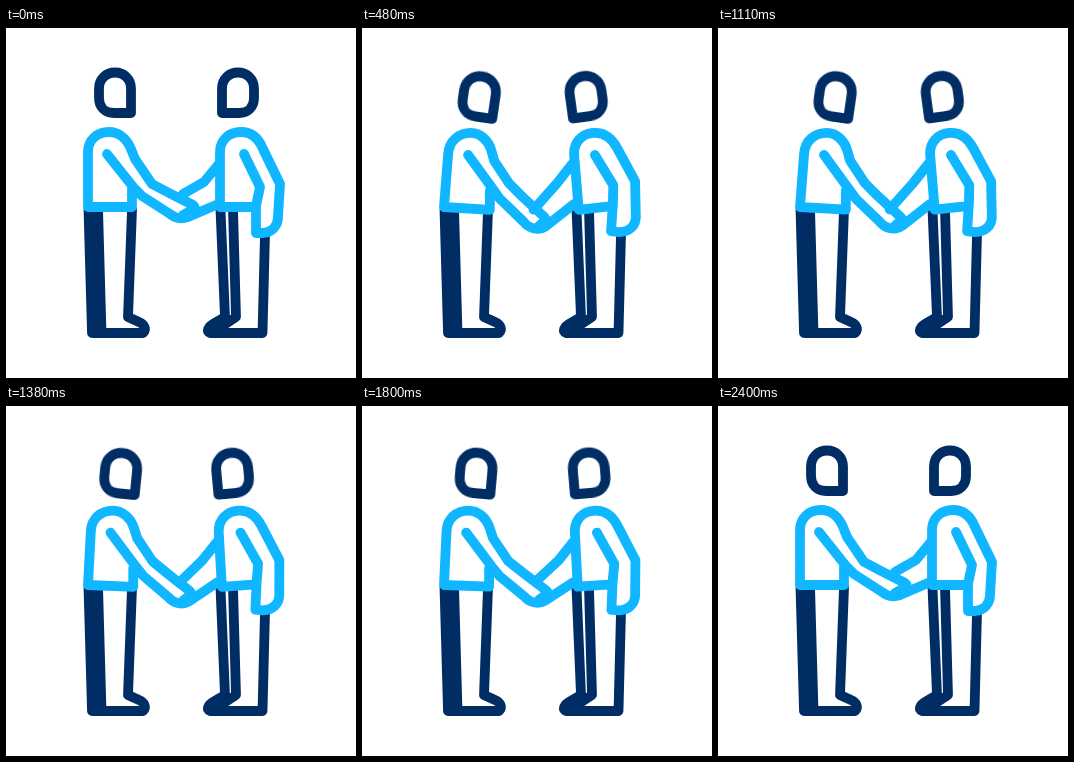
An HTML page without scripts for the animation above (8000 ms loop, 350x350 px).

```html
<!DOCTYPE html>
<html lang="en">
<head>
<meta charset="utf-8">
<title>Handshake</title>
<style>
html, body { margin: 0; width: 100%; height: 100%; overflow: hidden; background: #fff; }
svg { display: block; width: 100vw; height: 100vh; }
path { fill: none; stroke-width: 9.8; stroke-linecap: round; stroke-linejoin: round; }
.navy { stroke: #002d64; }
.blue { stroke: #10b6ff; }
.bend { d: var(--rest); animation: bend 8s infinite; }
.nod { animation: nod 8s infinite; }
.left { --tilt: 9deg; transform-origin: 87px 124px; }
.right { --tilt: -8.5deg; transform-origin: 253.5px 124px; }

/* three 800 ms shakes, then a pause */
@keyframes bend {
  0%, 10%, 20% { d: var(--rest); animation-timing-function: cubic-bezier(.32, 0, .58, 1); }
  5%, 15%, 25% { d: var(--low); animation-timing-function: cubic-bezier(.42, 0, .68, 1); }
  30%, 100% { d: var(--rest); }
}
@keyframes nod {
  0%, 10%, 20% { transform: rotate(0deg); animation-timing-function: cubic-bezier(.32, 0, .58, 1); }
  5%, 15%, 25% { transform: rotate(var(--tilt)); animation-timing-function: cubic-bezier(.42, 0, .68, 1); }
  30%, 100% { transform: rotate(0deg); }
}

.torso-l {
  --rest: path("M126 161 L126 179 L82 179 L82 124 C82 112 91 104 103 104 C113 104 121 111 125 121 L129 131 L146 156 L165 166 L187 177 C190 179 188 181 186 182 L177 187");
  --low: path("M128 163 L128 182 L82 179 L86.5 126 C87.5 113 97 105 109.5 105 C119 105 127 113 129.5 122 L132.5 133 L147 155 L160 169 L182 190 C184 192 183 194 181 195 L177 199");
}
.arm-l {
  --rest: path("M101 126 L128 160 L136 168 L164 186 C170 191 176 191 182 189 L210 177");
  --low: path("M106.5 127 L131 161 L138 171 L161 194 C167 202 177 204 184 199 L212 176");
}
.arm-r {
  --rest: path("M212 137 L198 154 L177 166");
  --low: path("M210 136 L195 155 L171 183");
}
.torso-r {
  --rest: path("M250 179 L214 179 L214 124 C214 112 223 104 235 104 C246 104 253 111 257 121 L274 156 L272 189 C272 198 266 204 257 205 L250 205 L250 178 L254 159 L238 126");
  --low: path("M249 178 L217 182 L212 128 C211 115 219 106 231 105 C242 104 250 111 255 120 L273 153 L274 189 C274 198 267 204 257 204 L249 203 L251 175 L251 157 L232.5 127");
}
</style>
</head>
<body>
<svg viewBox="0 0 350 350">
  <path class="navy" d="M82.5 182 L86 305 H137 C141 301 138 296 133 294 L122 289 L126 182 M92 180 L95.5 305"/>
  <path class="navy" d="M214.5 182 L219 289 L207 296 C202 299 200 304 204 305 H256.5 L259 206 M227 182 L230 289 L218 297 L210 305"/>
  <path class="navy nod left" d="M125 85 V60.5 C125 51 118 44.5 109 44.5 C100 44.5 93 51 93 60.5 V70 C93 79 99 85 108 85 Z"/>
  <path class="navy nod right" d="M216 85 V60.5 C216 51 223 44.5 232 44.5 C241 44.5 248 51 248 60.5 V70 C248 79 242 85 233 85 Z"/>
  <path class="blue bend arm-r"/>
  <path class="blue bend torso-r"/>
  <path class="blue bend torso-l"/>
  <path class="blue bend arm-l"/>
</svg>
</body>
</html>
```
